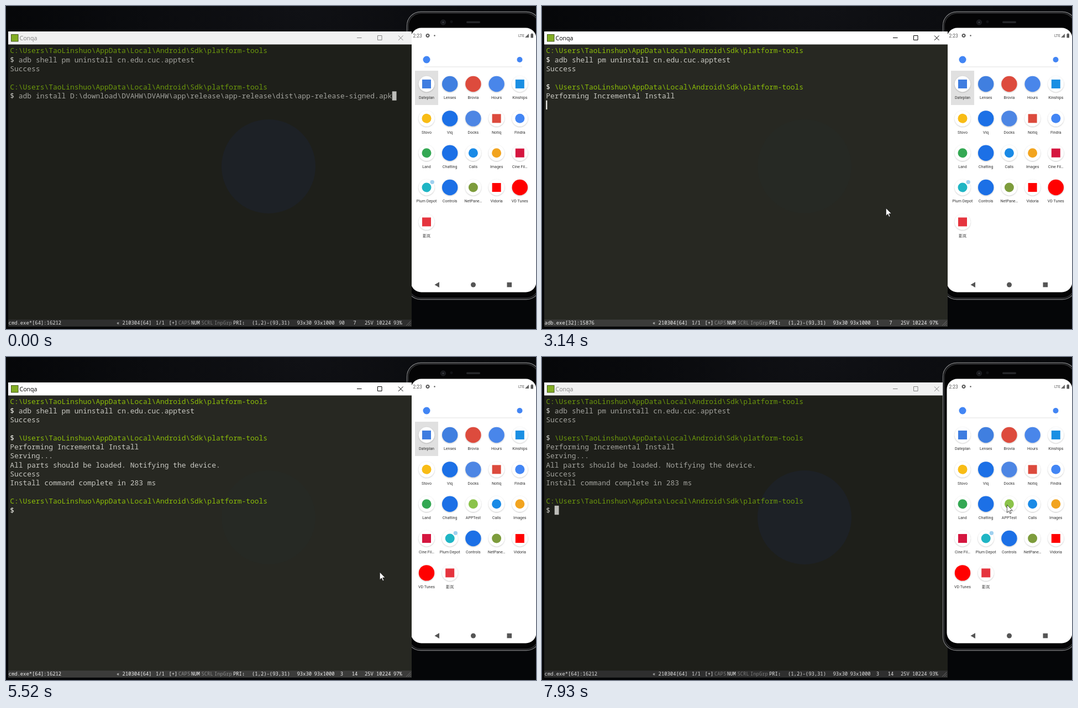
Animation of 959x584 px, one loop 8 s. Source, as an HTML page:

```html
<!DOCTYPE html>
<html lang="en">
<head>
<meta charset="utf-8">
<title>App install</title>
<style>
  html, body { margin: 0; width: 100%; height: 100%; overflow: hidden; background: #07080a; }
  svg { display: block; width: 100vw; height: 100vh; }
  text { white-space: pre; }
  .mono { font-family: "Noto Sans Mono", monospace; font-size: 12.95px; }
  .status { font-family: "Noto Sans Mono", monospace; font-size: 8.85px; }
  .title { font-family: "Open Sans", sans-serif; font-size: 10.6px; }
  .label { font-family: Roboto, "Noto Sans CJK SC", "Noto Sans CJK", sans-serif; font-size: 7.1px; fill: #333; text-anchor: middle; }
  .bar { font-family: Roboto, sans-serif; font-size: 8.4px; fill: #555; }
</style>
</head>
<body>
<svg viewBox="0 0 959 584">
  <defs>
    <radialGradient id="backdrop" cx=".55" cy="0" r=".6">
      <stop offset="0" stop-color="#101115"/><stop offset="1" stop-color="#050608"/>
    </radialGradient>
    <filter id="shadow" x="-30%" y="-30%" width="160%" height="160%">
      <feDropShadow dx="0" dy=".8" stdDeviation=".8" flood-opacity=".28"/>
    </filter>
  </defs>
  <rect width="959" height="584" fill="url(#backdrop)"/>
  <g id="scene"></g>
</svg>
<script>
const LOOP = 8000;
const FOCUS = 1070, ENTER = 3040, PROMPT = 3690, STATUS = 3780, INSTALLED = 4230, BLUR = 7700, DESELECT = 7930;
const CHAR = 7.77, LINE = 16.35, LEFT = 7.3, TOP = 72.8;

const themes = {
  active: { bg: '#272822', title: '#fff', ink: '#000', path: '#8bbd08', text: '#c9c9c3', dollar: '#f4f4ee',
    status: '#3b3b3a', statusText: '#f2f2f2', dim: '#8a8a8a', emblem: '#262924', load: '97%' },
  idle: { bg: '#1e1f1a', title: '#f1f1f1', ink: '#848484', path: '#6c980c', text: '#a3a39e', dollar: '#c8c8c3',
    status: '#2e2e2e', statusText: '#e2e2e2', dim: '#7a7a7a', emblem: '#1d2126', load: '93%' }
};

const folder = '\\Users\\TaoLinshuo\\AppData\\Local\\Android\\Sdk\\platform-tools';
const command = 'adb install D:\\download\\DVAHW\\DVAHW\\app\\release\\app-release\\dist\\app-release-signed.apk';
const output = ['Performing Incremental Install', 'Serving...',
  'All parts should be loaded. Notifying the device.', 'Success', 'Install command complete in 283 ms'];

// Label, colour, shape: "disc" fills the icon, the others sit on a white disc.
const apps = [
  ['Dateplan', '#3f7de0', 'square'], ['Lenses', '#3f7fe0', 'disc'], ['Brovia', '#dd4b3e', 'disc'],
  ['Hours', '#4a86ea', 'disc'], ['Kinships', '#1a8fe3', 'square'],
  ['Stovo', '#f8bc15', 'circle'], ['Viq', '#1a6fe6', 'disc'], ['Docks', '#4e86e4', 'disc'],
  ['Notiq', '#dc4a3d', 'square'], ['Findra', '#4285f4', 'circle'],
  ['Land', '#34a853', 'circle'], ['Chatting', '#1a6fe6', 'disc'], ['Calls', '#1a8ae6', 'circle'],
  ['Images', '#f2a41f', 'circle'], ['Cine Fil…', '#d5163f', 'square'],
  ['Plum Depot', '#1fb5c4', 'circle'], ['Controls', '#1a6fe6', 'disc'], ['NetPane…', '#7d9c3c', 'circle'],
  ['Vidoria', '#f00', 'square'], ['VD Tunes', '#f00', 'disc'], ['影岚', '#e5343e', 'square']
];
const added = ['APPTest', '#8bc34a', 'circle'];

const blinks = [FOCUS, 1600, 2150, 2700, ENTER, INSTALLED, 4780, 5310, 5850, 6280, 6830, 7380];
const arrival = [[410, 679, 407], [515, 640, 377], [620, 622, 365]];
const journey = [[5203, 622, 365], [5640, 732, 413], [6060, 807, 378], [6280, 821, 349],
  [6500, 831, 319], [6720, 831, 319], [7050, 846, 285], [7450, 841, 267]];

const rect = (x, y, w, h, fill, extra = '') => `<rect x="${x}" y="${y}" width="${w}" height="${h}" fill="${fill}" ${extra}/>`;
const circle = (x, y, r, fill, extra = '') => `<circle cx="${x}" cy="${y}" r="${r}" fill="${fill}" ${extra}/>`;
const text = (x, y, cls, str, fill = '', extra = '') =>
  `<text x="${x}" y="${y}" class="${cls}" ${fill && `fill="${fill}"`} ${extra}>${str}</text>`;
const stroke = (d, color, width = 1) => `<path d="${d}" fill="none" stroke="${color}" stroke-width="${width}"/>`;

function pointerAt(t) {
  if (t < arrival[0][0]) return null;
  if (t < 5310) return arrival.filter(k => k[0] <= t).pop().slice(1);
  const time = 5310 + Math.floor((t - 5310) / 107) * 107;
  const next = journey.findIndex(k => k[0] > time);
  if (next < 0) return journey[journey.length - 1].slice(1);
  const [t0, x0, y0] = journey[next - 1], [t1, x1, y1] = journey[next];
  const p = (time - t0) / (t1 - t0);
  return [x0 + (x1 - x0) * p, y0 + (y1 - y0) * p];
}

function shellText(t, c) {
  const shown = t < ENTER ? 0 : Math.min(5, 1 + Math.floor((t - ENTER) / 110));
  const row = (i, str, fill, col = 0) => text(LEFT + col * CHAR, TOP + 12.5 + i * LINE, 'mono', str, fill);
  const prompt = i => row(i, 'C:' + folder, c.path) + row(i + 1, '$', c.dollar);
  let out = prompt(0) + row(1, 'adb shell pm uninstall cn.edu.cuc.apptest', c.text, 2) + row(2, 'Success', c.text);
  let cursor = [89, 5];
  if (!shown) {
    out += prompt(4) + row(5, command, c.text, 2);
  } else {
    out += row(4, '$', c.dollar) + row(4, folder, c.path, 2);
    out += output.slice(0, shown).map((s, i) => row(5 + i, s, c.text)).join('');
    cursor = [0, shown === 5 ? 11 : 5 + shown];
  }
  if (t >= PROMPT) {
    out += prompt(11);
    cursor = [2, 12];
  }
  const idle = c === themes.idle;
  if (idle || blinks.filter(b => b <= t).length % 2)
    out += rect(LEFT - .1 + cursor[0] * CHAR, TOP - .2 + cursor[1] * LINE, idle ? 7.8 : 2.2, 16.4, idle ? '#bdbdb9' : '#f4f4f0');
  return out;
}

function statusBar(t, c) {
  const running = t >= ENTER && t < STATUS;
  const line = Math.min(10, 7 + Math.floor((t - ENTER) / 110));
  const [col, row] = t < ENTER ? [90, 7] : running ? [1, line] : [3, 14];
  const put = (x, str, fill = c.statusText, extra = '') => text(x, 576.3, 'status', str, fill, extra);
  const middle = 'text-anchor="middle"';
  return rect(4, 567, 730, 12.5, c.status)
    + put(4.6, running ? 'adb.exe[32]:15876' : 'cmd.exe*[64]:16212')
    + put(200, '« 210304[64]') + put(271, '1/1') + put(294.5, '[+]')
    + put(312, 'CAPS', c.dim) + put(335, 'NUM') + put(353.5, 'SCRL', c.dim) + put(377, 'InpGrp', c.dim)
    + put(411, 'PRI↕') + put(445, '(1,2)-(93,31)') + put(526.5, '93x30') + put(557.5, '93x1000')
    + put(607.5, col, undefined, middle) + put(631, row, undefined, middle)
    + put(649, '25V') + put(670, '10224') + put(701, c.load)
    + stroke('M724 578l8-8M727.5 578l4.5-4.5M731 578l1-1', '#777', .8);
}

function shell(t, c) {
  return rect(4, 46, 730, 533.5, c.bg) + rect(4, 46, 730, 23.5, c.title)
    + rect(9.5, 51.5, 12.5, 12.5, '#83ad24', 'stroke="#43591a"')
    + text(24.5, 61.7, 'title', 'Conqa', c.ink)
    + stroke('M635 57.5h8.5M672.5 53.5h7.5v8h-7.5zM710 53.5l8.5 8.5M718.5 53.5l-8.5 8.5', c.ink)
    + circle(475, 290, 85, c.emblem)
    + shellText(t, c) + statusBar(t, c);
}

function appIcon([label, color, shape], i, dotted) {
  const x = 761 + (i % 5) * 42.2, y = 141 + Math.floor(i / 5) * 62.35;
  let icon = circle(x, y, 14.2, shape === 'disc' ? color : '#fff', 'filter="url(#shadow)"');
  if (shape === 'square') icon += rect(x - 8, y - 8, 16, 16, color);
  if (shape === 'circle') icon += circle(x, y, 8.5, color);
  if (dotted) icon += circle(x + 10.2, y - 9.7, 3.7, '#9fd0ef');
  return icon + text(x, y + 27.3, 'label', label);
}

function handset(t) {
  const list = t < INSTALLED ? apps : [...apps.slice(0, 12), added, ...apps.slice(12)];
  const outline = (x, y, w, h, r, fill, color, width) =>
    rect(x, y, w, h, fill, `rx="${r}" stroke="${color}" stroke-width="${width}"`);
  const gear = circle(763, 53.5, 2.3, 'none', 'stroke="#555" stroke-width="1.7"')
    + circle(763, 53.5, 3.3, 'none', 'stroke="#555" stroke-dasharray="1.3 1.29"');
  return outline(725.5, 10.5, 241, 520, 25, '#08080a', '#77787a', 1.3)
    + outline(728, 13, 236, 515, 23, '#040405', '#303133', 1.4)
    + circle(791, 29.5, 4.5, '#17181b', 'stroke="#26272b"') + circle(791, 29.5, 1.6, '#3b3d44')
    + circle(806, 28.5, 2.5, '#111215') + rect(833, 27.5, 25, 3.4, '#26272a', 'rx="1.7"')
    + rect(732.5, 39.5, 227, 478, '#fff', 'rx="19"')
    + text(736.5, 56.6, 'bar', '2:23') + gear + circle(775.5, 53.5, 1.2, '#555')
    + text(927, 56.4, 'bar', 'LTE', '', 'style="font-size:7px"')
    + '<path d="M939 57h7v-7z" fill="#666"/>' + rect(949.5, 50.5, 4.5, 7, '#555', 'rx=".6"') + rect(950.8, 49.5, 2, 1.5, '#555')
    + rect(747, 84, 197, 26, '#fff', 'rx="13"') + stroke('M757 110h177', '#dedede', .9)
    + circle(761, 97, 6.5, '#4285f4') + circle(929.5, 97, 5, '#4285f4')
    + (t < DESELECT ? rect(740, 117, 42, 62, '#e0e0e0') : '')
    + list.map((app, i) => appIcon(app, i, app === apps[15])).join('')
    + '<path d="M784 499v10l-8.5-5z" fill="#555"/>' + circle(845.5, 504, 4.5, '#555') + rect(906.5, 499.7, 8.6, 8.6, '#555');
}

function pointer(t) {
  const tip = pointerAt(t);
  if (!tip) return '';
  const clicked = (t >= FOCUS && t < 1290) || (t >= BLUR && t < DESELECT);
  return (clicked ? circle(...tip, 10, '#ff0', 'fill-opacity=".47"') : '')
    + `<path transform="translate(${tip})" d="M.4.4v14l3.3-3.1 2.2 5 2.1-.9-2.2-4.9h4.5z" fill="#fff" stroke="#111" stroke-width=".7"/>`;
}

function draw(t) {
  const active = t >= FOCUS && t < BLUR;
  const layers = [handset(t), shell(t, active ? themes.active : themes.idle)];
  if (t >= BLUR) layers.reverse();
  return layers.join('') + pointer(t);
}

const scene = document.getElementById('scene');
let last = '';
function tick(now) {
  const markup = draw(now % LOOP);
  if (markup !== last) scene.innerHTML = last = markup;
  requestAnimationFrame(tick);
}
tick(0);
</script>
</body>
</html>
```
